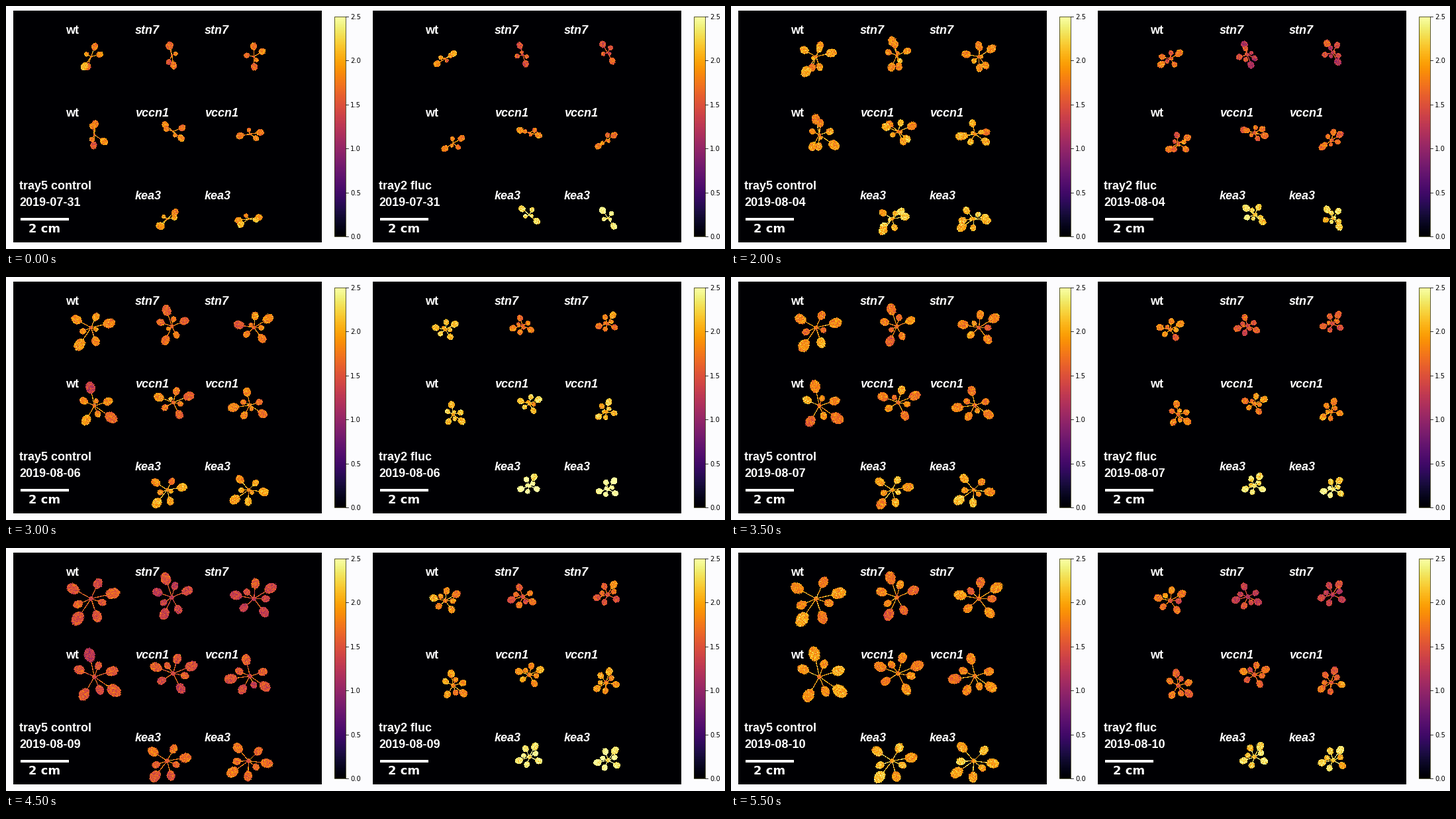
These frames come from a looping animation (1086x367 px, 6 s). A matplotlib script:

```python
import numpy as np
import matplotlib.pyplot as plt
from matplotlib.animation import FuncAnimation
from matplotlib.patches import Rectangle

W, H, DPI = 1086, 367, 72  # at 72 dpi a point is a pixel
PANEL_X, PANEL_Y, PANEL_W, PANEL_H = 11, 7, 466, 350
TRAY_STEP = 543
VMAX = 2.5
LAST_DAY = 10
GOLDEN_ANGLE = 137.5
LEAF_COUNT = 7
REACH = 64  # half the side of the area one plant may cover

GENOTYPES = ["wt", "stn7", "stn7", "wt", "vccn1", "vccn1", "kea3", "kea3"]
SHIFT = {"wt": 0, "stn7": -0.33, "vccn1": 0, "kea3": 0.55}
LEVEL_DAYS = [0, 2, 4, 6, 8, 9, 10]

# Plants: centre x, y, direction of the seed leaves, direction of first leaf.
TRAYS = [
    dict(title="tray5 control", size=31, wt_gain=1.22, stress=0.28,
         levels=[1.8, 1.97, 1.93, 1.8, 1.85, 1.5, 1.87],
         plants=[(128, 76, 70, 236), (250, 74, 100, 108),
                 (374, 76, 92, 32), (133, 194, 86, 325),
                 (252, 189, 140, 22), (368, 193, 190, 188),
                 (243, 321, 40, 232), (366, 321, 8, 215)]),
    dict(title="tray2 fluc", size=18.5, wt_gain=1.08, stress=1,
         levels=[1.8, 1.75, 1.7, 2.1, 1.6, 1.9, 1.68],
         plants=[(120, 79, 32, 30), (237, 73, 108, 195),
                 (365, 70, 120, 58), (132, 207, 32, 322),
                 (247, 191, 165, 25), (363, 203, 215, 75),
                 (247, 315, 140, 62), (366, 320, 125, 55)]),
]


def rosette(day, size, seed_axis, first_angle):
    """Yield (angle, reach) of every leaf, oldest first."""
    if day <= 4:
        for angle in (seed_axis, seed_axis + 180):
            yield angle, 13 + 0.08 * size + 0.4 * day
    for k in range(LEAF_COUNT):
        age = day + 4 - 1.5 * k
        if age > 0:
            yield first_angle + GOLDEN_ANGLE * k, size * (age / 14) ** 0.6


def paint_plant(panel, plant, size, level, day, seed):
    x, y, seed_axis, first_angle = plant
    cx, cy = x - PANEL_X, y - PANEL_Y
    top, left = max(cy - REACH, 0), max(cx - REACH, 0)
    view = panel[top:cy + REACH, left:cx + REACH]
    yy, xx = np.mgrid[top:top + view.shape[0], left:left + view.shape[1]]
    dx, dy = xx - cx, cy - yy
    rng = np.random.default_rng([seed, day])
    rough = rng.normal(0, 0.04, view.shape)
    grain = rng.normal(0, 0.2, view.shape)

    def paint(mask, value):
        view[mask] = np.clip(value + grain[mask], 0.2, VMAX)

    blades = []
    for angle, reach in rosette(day, size, seed_axis, first_angle):
        a = np.radians(angle)
        along = dx * np.cos(a) + dy * np.sin(a)
        across = dy * np.cos(a) - dx * np.sin(a)
        paint((along > 0) & (along < reach) & (np.abs(across) < 0.65),
              level + 0.15)
        blades.append(np.hypot((along - reach) / (1.5 + 0.28 * reach),
                               across / (2.2 + 0.18 * reach)) + rough < 1)
    for blade in blades:
        paint(blade, level + rng.normal(0, 0.11))
    paint(np.hypot(dx, dy) < 2 + 0.15 * day, level - 0.1)


def paint_tray(index, day):
    tray = TRAYS[index]
    panel = np.zeros((PANEL_H, PANEL_W))
    mood = np.interp(day, LEVEL_DAYS, tray["levels"])
    for k, (name, plant) in enumerate(zip(GENOTYPES, tray["plants"])):
        size = tray["size"] * (tray["wt_gain"] if name == "wt" else 1)
        level = mood + tray["stress"] * SHIFT[name]
        paint_plant(panel, plant, size, level, day, 100 * index + k)
    return panel


fig = plt.figure(figsize=(W / DPI, H / DPI), dpi=DPI, facecolor="#fcfcfe")
ax = fig.add_axes([0, 0, 1, 1])


def label(x, y, text, font="Liberation Sans", size=18, color="white",
          va="baseline", **style):
    return ax.text(x, y, text, family=font, fontsize=size, color=color,
                   va=va, **style)


def draw_colorbar(left):
    width, top, bottom = 16.6, 16, 348
    right = left + width
    ax.imshow(np.linspace(1, 0, 256)[:, None], cmap="inferno", aspect="auto",
              extent=(left, right, bottom, top))
    ax.add_patch(Rectangle((left, top), width, bottom - top, fill=False,
                           ec="#30300c", lw=0.8))
    for v in np.arange(0, VMAX + 0.1, 0.5):
        y = bottom - v / VMAX * (bottom - top)
        ax.plot([right, right + 3.5], [y, y], color="black", lw=0.8)
        label(right + 7, y, f"{v:.1f}", "DejaVu Sans", 10, "black",
              va="center_baseline")


def draw_tray(index):
    x0 = index * TRAY_STEP
    left = PANEL_X + x0
    image = ax.imshow(np.zeros((PANEL_H, PANEL_W)), cmap="inferno", vmin=0,
                      vmax=VMAX, interpolation="nearest", aspect="auto",
                      extent=(left, left + PANEL_W, PANEL_Y + PANEL_H, PANEL_Y))
    for k, name in enumerate(GENOTYPES):
        row, column = divmod(k if k < 6 else k + 1, 3)  # last row skips wt
        label(x0 + 90 + 105 * column, 42 + 125 * row, name, weight="bold",
              style="normal" if name == "wt" else "italic")
    label(x0 + 20, 277, TRAYS[index]["title"], weight="bold")
    date = label(x0 + 20, 302, "", weight="bold")
    ax.add_patch(Rectangle((x0 + 22, 320), 73, 4, color="white", lw=0))
    label(x0 + 34, 342, "2 cm", "DejaVu Sans", weight="bold")
    draw_colorbar(x0 + 496.4)
    return image, date


panels = [draw_tray(i) for i in range(len(TRAYS))]
ax.set(xlim=(0, W), ylim=(H, 0))
ax.axis("off")


def update(frame):
    day = min(frame, LAST_DAY)  # the last day is held twice as long
    date_text = f"2019-08-{day:02d}" if day else "2019-07-31"
    for index, (image, date) in enumerate(panels):
        image.set_data(paint_tray(index, day))
        date.set_text(date_text)
    return [artist for pair in panels for artist in pair]


anim = FuncAnimation(fig, update, frames=12, interval=500, repeat=True,
                     repeat_delay=0, blit=False)
plt.show()
```
